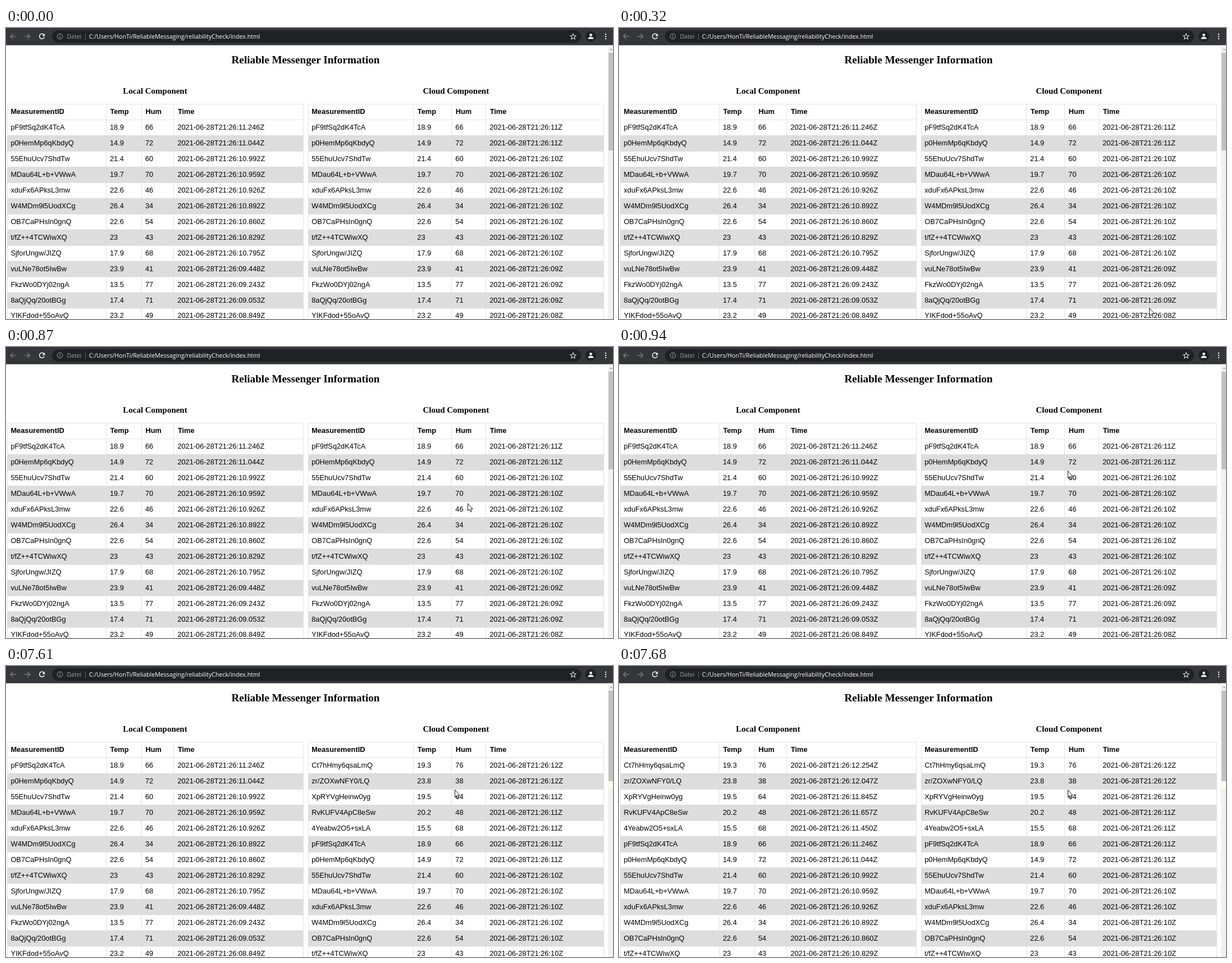
These frames come from a looping animation (1081x518 px, 8 s). An HTML page:

```html
<!DOCTYPE html>
<html lang="en">
<head>
<meta charset="utf-8">
<title>Reliable Messenger Information</title>
<style>
html, body { margin: 0; width: 100%; height: 100%; overflow: hidden; background: #fff; }
svg { display: block; }
.cell { font: 12.8px "Liberation Sans", Arial, sans-serif; }
.head { font-weight: bold; }
.title { font: bold 19.2px "Liberation Serif", "Times New Roman", serif; text-anchor: middle; }
.sub { font: bold 14.98px "Liberation Serif", "Times New Roman", serif; text-anchor: middle; }
.url { font: 10.6px "Open Sans", "Noto Sans", sans-serif; }
</style>
</head>
<body>
<svg id="stage" width="1081" height="518" viewBox="0 0 1081 518"></svg>
<script>
const LOOP = 8000, ROW = 27.96, TOP = 135, LINE = 0.8, SHOWN = 13;

// Newest first: id, temperature, humidity, seconds after 21:26
const DATA = `Ct7hHmy6qsaLmQ 19.3 76 12.254
zr/ZOXwNFY0/LQ 23.8 38 12.047
XpRYVgHeinw0yg 19.5 64 11.845
RvKUFV4ApC8eSw 20.2 48 11.657
4Yeabw2O5+sxLA 15.5 68 11.450
pF9tfSq2dK4TcA 18.9 66 11.246
p0HemMp6qKbdyQ 14.9 72 11.044
55EhuUcv7ShdTw 21.4 60 10.992
MDau64L+b+VWwA 19.7 70 10.959
xduFx6APksL3mw 22.6 46 10.926
W4MDm9l5UodXCg 26.4 34 10.892
OB7CaPHsIn0gnQ 22.6 54 10.860
t/fZ++4TCWiwXQ 23 43 10.829
SjforUngw/JIZQ 17.9 68 10.795
vuLNe78ot5IwBw 23.9 41 09.448
FkzWo0DYj02ngA 13.5 77 09.243
8aQjQq/20otBGg 17.4 71 09.053
YIKFdod+55oAvQ 23.2 49 08.849`.split("\n").map(line => line.split(" "));

const stage = document.getElementById("stage");

function add(tag, attrs, text) {
  const el = document.createElementNS("http://www.w3.org/2000/svg", tag);
  for (const key in attrs) el.setAttribute(key, attrs[key]);
  if (text) el.textContent = text;
  stage.appendChild(el);
  return el;
}
const rect = (x, y, width, height, fill, rx = 0) => add("rect", { x, y, width, height, fill, rx });
const circle = (cx, cy, r, fill, stroke = "none") => add("circle", { cx, cy, r, fill, stroke });
const stroke = (d, color, width = 1.3) => add("path", { d, fill: "none", stroke: color, "stroke-width": width });
const label = (x, y, cls, text, fill = "#000") => add("text", { x, y, class: cls, fill }, text);

function drawToolbar() {
  const dim = "#7b7d81", lit = "#f1f3f4", grey = "#9aa0a6";
  rect(0, 0, 1081, 30.7, "#35363a");
  rect(82, 4, 942, 22.4, "#202124", 11.2);
  stroke("M17.5 15H8M12.5 10.3L7.8 15L12.5 19.7", dim);
  stroke("M33 15H42.5M38 10.3L42.7 15L38 19.7", dim);
  stroke("M67.6 12A4.5 4.5 0 1 0 68.2 16.6", lit, 1.5);
  add("path", { d: "M69.2 9.8V14.4H64.6Z", fill: lit });
  circle(96, 15, 4.8, "none", grey);
  rect(95.4, 14.3, 1.2, 3.5, grey);
  rect(95.4, 12, 1.2, 1.3, grey);
  label(108.4, 19.2, "url", "Datei", grey);
  rect(141, 10, 1, 11, "#5f6368");
  label(147.8, 19.2, "url", "C:/Users/HonTi/ReliableMessaging/reliabilityCheck/index.html", "#fff");

  let star = "";
  for (let i = 0; i < 10; i++) {
    const r = i % 2 ? 2.4 : 5.4, a = i * Math.PI / 5 - Math.PI / 2;
    star += (i ? "L" : "M") + (1010 + r * Math.cos(a)).toFixed(2) + " " + (15.4 + r * Math.sin(a)).toFixed(2);
  }
  stroke(star + "Z", "#dcdee0", 1.1);

  circle(1041.5, 15, 9.5, "#202124");
  circle(1041.5, 12.4, 2.4, lit);
  add("path", { d: "M1036.7 19.6V18.4C1036.7 16.6 1039.6 15.8 1041.5 15.8S1046.3 16.6 1046.3 18.4V19.6Z", fill: lit });
  for (const y of [11, 15, 19]) circle(1068, y, 1.2, lit);
}

function makeTable(lines, textX, formatTime) {
  const left = lines[0], width = lines[4] - left + LINE;
  for (let i = 0; i <= SHOWN; i++) {
    const striped = i && i % 2 === 0;
    rect(left, TOP + i * ROW, width, striped ? ROW + LINE : LINE, "#ddd");
  }
  for (const x of lines) rect(x, TOP, LINE, 518 - TOP, "#ddd");
  ["MeasurementID", "Temp", "Hum", "Time"].forEach((name, c) =>
    label(textX[c] + (c ? 0.5 : 0), TOP + 18, "cell head", name));

  const cells = [];
  for (let r = 0; r < SHOWN; r++)
    cells.push(textX.map(x => label(x, TOP + 18 + (r + 1) * ROW, "cell", "")));

  let current = -1;
  return first => {
    if (first === current) return;
    current = first;
    cells.forEach((row, r) => row.forEach((cell, c) => {
      const value = DATA[first + r][c];
      cell.textContent = c < 3 ? value : "2021-06-28T21:26:" + formatTime(value) + "Z";
    }));
  };
}

drawToolbar();
label(533.5, 63, "title", "Reliable Messenger Information");
label(265.5, 117, "sub", "Local Component");
label(801.3, 117, "sub", "Cloud Component");
const showLocal = makeTable([2, 178, 241, 298, 529], [8.4, 184.9, 248, 305.4], s => s);
const showCloud = makeTable([538, 725, 793, 854, 1064], [544.2, 732.3, 800.3, 861.2], s => s.slice(0, 2));

rect(1072, 30.7, 9, 488, "#f1f1f1");
add("path", { d: "M1075 39.2L1077.8 36.4L1080.6 39.2Z", fill: "#a3a3a3" });
const flash = rect(1073, 205, 8, 13, "#fdfdee");
const thumb = rect(1073, 44, 8, 174, "#c1c1c1");

const cursor = add("path", {
  d: "M.5 .6V13.6L3.4 10.9L5.5 15.6L7.4 14.8L5.4 10.2H9.3Z",
  fill: "#fff", stroke: "#000", "stroke-width": 0.9
});

// Latest value whose start time has passed
const at = (steps, t) => steps.filter(s => s[0] <= t).pop().slice(1);

const POINTER = [[0, -50, -50], [320, 944, 498], [390, 888, 428], [460, 860, 391], [870, 822, 278], [940, 799, 220]];
const CLOUD = [[0, 5, 218], [7000, 1, 208], [7610, 0, 205]];
const LOCAL = [[0, 5], [7680, 0]];

function frame() {
  const t = performance.now() % LOOP;
  const [x, y] = at(POINTER, t);
  const [first, thumbEnd] = at(CLOUD, t);
  cursor.setAttribute("transform", `translate(${x} ${y})`);
  showCloud(first);
  showLocal(at(LOCAL, t)[0]);
  thumb.setAttribute("height", thumbEnd - 44);
  flash.setAttribute("visibility", thumbEnd < 218 ? "visible" : "hidden");
  requestAnimationFrame(frame);
}
frame();
</script>
</body>
</html>
```
